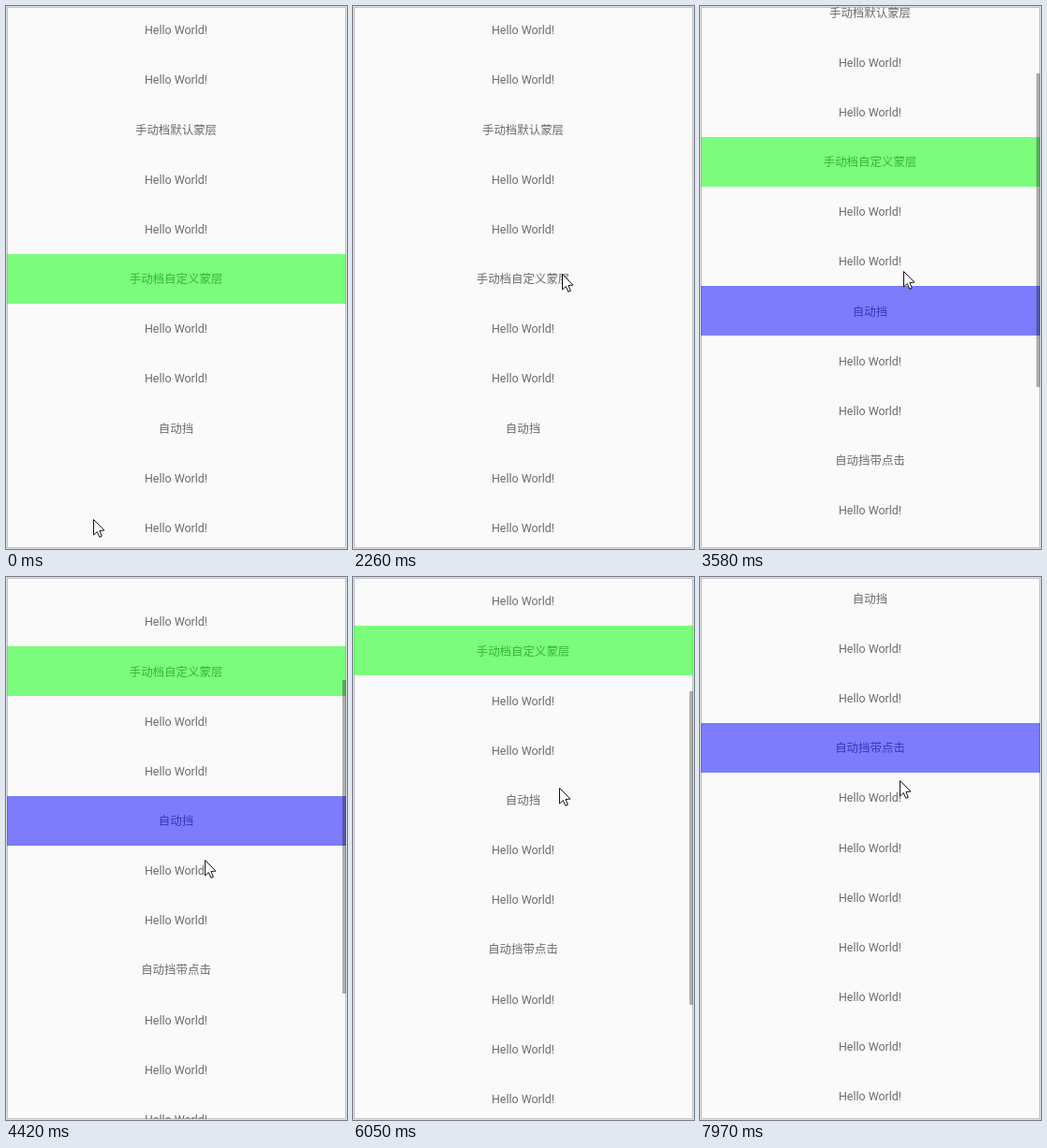
An HTML page with a canvas for the animation above (8 s loop, 364x580 px).

```html
<!DOCTYPE html>
<html lang="zh">
<head>
<meta charset="utf-8">
<style>
html, body { margin: 0; height: 100%; overflow: hidden; background: #fafafa; }
canvas { display: block; }
</style>
</head>
<body>
<canvas id="stage" width="364" height="580"></canvas>
<script>
const ctx = document.getElementById('stage').getContext('2d');
const W = 364, H = 580, LOOP = 8000, PITCH = 53.15, ROWS = 19;
const labels = { 2: '手动档默认蒙层', 5: '手动档自定义蒙层', 8: '自动挡', 11: '自动挡带点击' };

// Bursts of movement: start, end, number of steps; the picture rests in between.
const bursts = [
  [0, 0, 1], [70, 520, 7], [690, 1070, 6], [1240, 1860, 9], [2030, 2260, 4],
  [2410, 2410, 1], [2560, 2640, 2], [2870, 3650, 11], [3800, 4110, 5],
  [4340, 5110, 11], [5280, 5510, 4], [5660, 6430, 11], [6520, 7050, 8],
  [7350, 7740, 6], [7970, 7970, 1]
];

// Mouse: time, x, y
const mouse = [
  [0, 93, 548], [200, 122, 470], [520, 189, 224], [690, 191, 200], [990, 199, 140],
  [1240, 199, 143], [1400, 201, 160], [1860, 220, 258], [2260, 223, 286],
  [2410, 223, 289], [2560, 229, 290], [2640, 228, 290], [3026, 226, 438],
  [3104, 225, 432], [3182, 224, 408], [3650, 216, 258], [4110, 212, 296],
  [4417, 212, 302], [4800, 216, 268], [5110, 220, 248], [5510, 220, 246],
  [6045, 220, 225], [6430, 215, 390], [6820, 212, 210], [7050, 213, 200],
  [7350, 213, 178], [7430, 213, 176], [7740, 213, 176], [7970, 213, 217]
];

// List offset: time, pixels
const scroll = [
  [3182, 0], [3650, 150], [4110, 188], [4417, 190.5], [5110, 223.5], [5280, 222.7],
  [5510, 223.5], [6045, 212.5], [6430, 228], [6820, 372], [7050, 427.6]
];

const masks = [
  { row: 2, color: 'rgba(0,0,0,.2)', on: t => t >= 1240 && t < 2260 },
  { row: 5, color: 'rgba(0,255,0,.5)', on: t => t < 1070 || t >= 2410 },
  { row: 8, color: 'rgba(0,0,255,.5)', on: t => t >= 3100 && t < 5280 },
  { row: 11, color: 'rgba(0,0,255,.5)', on: t => t >= 7500 }
];

function sample(keys, t, col) {
  const i = keys.findIndex(k => k[0] > t);
  if (i === 0) return keys[0][col];
  if (i < 0) return keys[keys.length - 1][col];
  const a = keys[i - 1], b = keys[i];
  return a[col] + (b[col] - a[col]) * (t - a[0]) / (b[0] - a[0]);
}

function stepTime(t) {
  const [a, b, n] = bursts.filter(s => s[0] <= t).pop();
  if (n < 2) return a;
  const step = (b - a) / (n - 1);
  return a + step * Math.min(n - 1, Math.floor((t - a) / step));
}

function drawCursor(x, y) {
  const arrow = [[0, 0], [0, 16.5], [3.8, 13], [6.3, 18.8], [8.8, 17.8], [6.4, 12], [11.4, 11.6]];
  ctx.beginPath();
  arrow.forEach(([dx, dy]) => ctx.lineTo(x + dx + .5, y + dy + .5));
  ctx.closePath();
  ctx.fillStyle = '#fff';
  ctx.fill();
  ctx.strokeStyle = '#111';
  ctx.stroke();
}

function draw(t) {
  const offset = sample(scroll, t, 1);
  const top = i => i * PITCH - 1 - offset;

  ctx.fillStyle = '#fafafa';
  ctx.fillRect(0, 0, W, H);
  ctx.lineWidth = 1;
  ctx.strokeStyle = '#c4c6c8';
  ctx.strokeRect(1.5, 1.5, W - 3, H - 3);

  ctx.save();
  ctx.beginPath();
  ctx.rect(1, 1, W - 2, H - 2);
  ctx.clip();
  ctx.font = '12.45px Roboto, "Noto Sans CJK SC", "Noto Sans CJK", sans-serif';
  ctx.textAlign = 'center';
  ctx.fillStyle = '#6c6c6c';
  for (let i = 0; i < ROWS; i++)
    ctx.fillText(labels[i] || 'Hello World!', 181.5, Math.round(top(i) + 31.3));
  for (const m of masks) {
    if (!m.on(t)) continue;
    const y = Math.round(top(m.row));
    ctx.fillStyle = m.color;
    ctx.fillRect(1, y, W - 2, Math.round(top(m.row + 1)) - y);
  }
  const fade = t <= 3182 ? 0 : Math.max(0, Math.min(1, (7660 - t) / 310));
  ctx.fillStyle = `rgba(0,0,0,${.3 * fade})`;
  ctx.fillRect(359, Math.round(1 + offset * .57), 4, 335);
  ctx.restore();

  ctx.strokeStyle = '#dadcde';
  ctx.strokeRect(.5, .5, W - 1, H - 1);
  drawCursor(Math.round(sample(mouse, t, 1)), Math.round(sample(mouse, t, 2)));
}

const start = performance.now();
function tick() {
  const t = (performance.now() - start) % LOOP;
  draw(stepTime(t + 5));
  requestAnimationFrame(tick);
}
tick();
</script>
</body>
</html>
```
